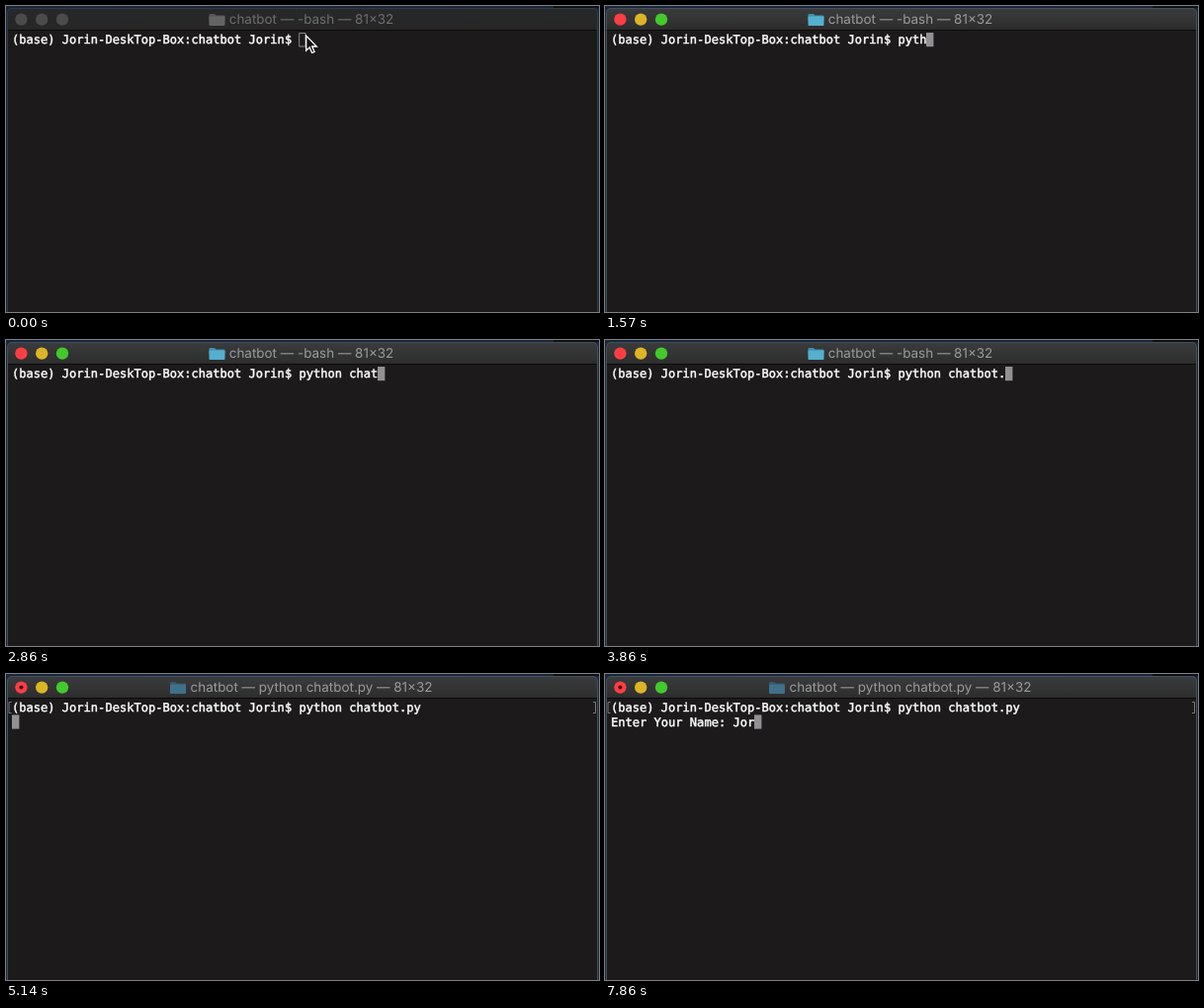
Animation of 600x310 px, one loop 8 s. Source, as an HTML page with a canvas:

```html
<!DOCTYPE html>
<html lang="en">
<head>
<meta charset="utf-8">
<title>Terminal</title>
<style>
html, body { margin: 0; width: 100%; height: 100%; overflow: hidden; background: #1c1a1b; }
canvas { display: block; }
</style>
</head>
<body>
<canvas id="stage" width="600" height="310"></canvas>
<script>
const g = document.getElementById('stage').getContext('2d');
const LOOP = 8000, CELL = 7.26, LINE = 14.4, LEFT = 6, TOP = 27;
const PROMPT = '(base) Jorin-DeskTop-Box:chatbot Jorin$ ';
const COMMAND = 'python chatbot.py';
const QUESTION = 'Enter Your Name: ';
const NAME = 'Jor';

// [time, characters typed so far]
const COMMAND_KEYS = [[1290, 2], [1430, 3], [1570, 4], [1860, 5], [2000, 6], [2140, 7],
  [2430, 9], [2570, 10], [2860, 11], [3140, 12], [3570, 13], [3710, 14], [3860, 15],
  [4290, 16], [4430, 17]];
const NAME_KEYS = [[7710, 2], [7860, 3]];

const typed = (keys, t) => keys.reduce((n, [at, count]) => t >= at ? count : n, 0);

function rect(x, y, w, h, color) {
  g.fillStyle = color;
  g.fillRect(x, y, w, h);
}

function panel(x, y, w, h, r, color) {
  g.fillStyle = color;
  g.beginPath();
  g.roundRect(x, y, w, h, r);
  g.fill();
}

function disc(x, y, r, color) {
  g.fillStyle = color;
  g.beginPath();
  g.arc(x, y, r, 0, 7);
  g.fill();
}

function line(points, color, width) {
  g.strokeStyle = color;
  g.lineWidth = width;
  g.stroke(new Path2D(points));
}

function row(text, n) {
  g.font = '12.06px "DejaVu Sans Mono", monospace';
  g.textAlign = 'left';
  g.fillStyle = g.strokeStyle = '#fff';
  g.lineWidth = 0.45;
  [...text].forEach((c, i) => {
    const x = LEFT + i * CELL, y = TOP + 11.2 + n * LINE;
    g.fillText(c, x, y);
    g.strokeText(c, x, y);
  });
}

function caret(col, n, hollow) {
  const x = Math.round(LEFT + col * CELL), y = TOP + n * LINE;
  if (hollow) line(`M${x + 0.7} ${y + 0.5}h6.3v13.5h-6.3z`, '#8c8c8c', 1);
  else rect(x, y, 7.4, 14.2, '#929092');
}

function folder(x, color, flap) {
  g.fillStyle = flap;
  g.fill(new Path2D(`M${x} 9q0-1 1-1h4.5l1.5 1.5h8q1 0 1 1v4h-16z`));
  panel(x, 10.5, 16, 9.5, 1, color);
}

function frame(active, running) {
  rect(0, 0, 600, 310, '#16263c');
  rect(554, 0, 46, 2, '#0d1117');
  panel(1, 2, 598, 320, 5, active ? '#47505a' : '#2f3a48');

  const bar = g.createLinearGradient(0, 3, 0, 24);
  bar.addColorStop(0, active ? '#3a3b3c' : '#272829');
  bar.addColorStop(1, active ? '#2d2d2e' : '#262627');
  panel(2, 3, 596, 40, 4, bar);
  rect(2, 24, 596, 286, '#1c1a1b');
  rect(2, 24, 596, 1, '#0b0b0b');

  const lights = active ? ['#fa3e44', '#dcb526', '#43c92c'] : Array(3).fill('#4b4b4c');
  lights.forEach((color, i) => disc(15.4 + i * 20.8, 13.6, 6.2, color));
  if (running) disc(15.4, 13.6, 2, '#450608');

  if (running) folder(166, '#41708a', '#36596b');
  else if (active) folder(205.5, '#55afcf', '#3f8fae');
  else folder(205.5, '#646465', '#555556');
  g.font = '13.45px Inter, sans-serif';
  g.textAlign = 'center';
  g.fillStyle = active ? '#9b9b9c' : '#6e6e6f';
  g.fillText(`chatbot — ${running ? COMMAND : '-bash'} — 81×32`, 309, 18.4);
}

function arrow() {
  const shape = new Path2D('M303.7 30v15.2l3.5-3.3 2.4 5.6 2.5-1.1-2.4-5.4h4.6z');
  g.fillStyle = '#111';
  g.fill(shape);
  g.strokeStyle = '#fff';
  g.lineWidth = 1.3;
  g.stroke(shape);
}

function ibeam() {
  const shape = 'M299.5 25.5q3.5 0 3.5 2.5v10q0 2.5-3.5 2.5M306.5 25.5q-3.5 0-3.5 2.5v10q0 2.5 3.5 2.5M301 34.5h4';
  line(shape, '#f2f2f2', 3);
  line(shape, '#161616', 1);
}

function draw(t) {
  const active = t >= 430, entered = t >= 5000, running = t >= 5140;
  g.textRendering = 'geometricPrecision';
  frame(active, running);

  const command = PROMPT + COMMAND.slice(0, typed(COMMAND_KEYS, t));
  const answer = t >= 6860 ? QUESTION + NAME.slice(0, typed(NAME_KEYS, t)) : '';
  if (entered) {
    line('M5.5 28.5h-2.5v11h2.5M594 28.5h2.5v11h-2.5', '#78787a', 1);
    caret(answer.length, 1);
  } else {
    caret(command.length, 0, !active);
  }
  row(command, 0);
  row(answer, 1);

  if (t < 140) arrow();
  else if (active && t < 1290) ibeam();
}

const start = performance.now();
function tick() {
  draw((performance.now() - start) % LOOP);
  requestAnimationFrame(tick);
}
tick();
</script>
</body>
</html>
```
